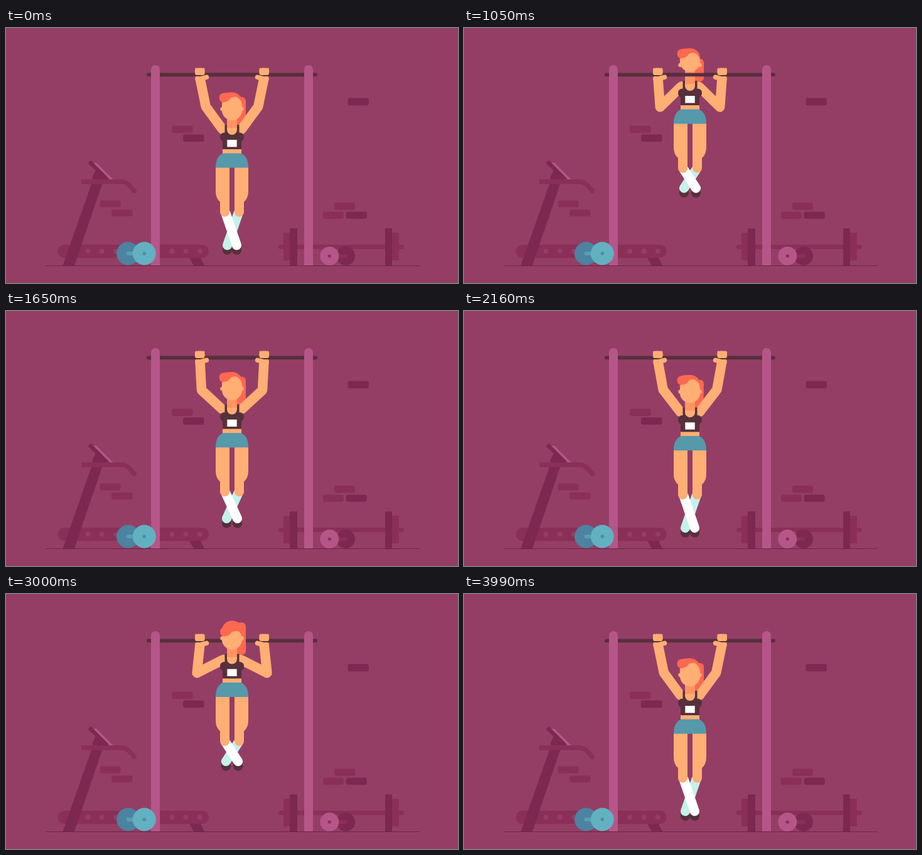
An HTML page for the animation above (4.02 s loop, 720 px wide and 406 px high).

```html
<!DOCTYPE html>
<html lang="en">
<head>
<meta charset="utf-8">
<title>Pull-ups</title>
<style>
html, body { margin: 0; width: 100%; height: 100%; overflow: hidden; background: #943e66; }
svg { display: block; width: 100vw; height: 100vh; }
.dark { fill: #7c2850; }
.mid { fill: #8a2f57; }
.pink { fill: #b65688; }
.skin { fill: #ffae74; }
.ink { fill: #56303b; }
.hair { fill: #ff6850; }
.limb { fill: none; stroke-width: 15; stroke-linecap: round; }
</style>
</head>
<body>
<svg viewBox="0 0 720 406">
  <defs>
    <g id="arm">
      <path id="bones" fill="none" stroke="#ffae74" stroke-width="15.5" stroke-linejoin="round"/>
      <rect class="skin" x="301.3" y="77" width="15.6" height="7" rx="2"/>
    </g>
    <g id="hand" class="skin">
      <rect x="301" y="66" width="15.5" height="9" rx="3"/>
      <rect x="301" y="63.5" width="4.4" height="9" rx="2.2"/>
      <rect x="304.7" y="63.2" width="4.4" height="9" rx="2.2"/>
      <rect x="308.4" y="63.2" width="4.4" height="9" rx="2.2"/>
      <rect x="312.1" y="63.5" width="4.4" height="9" rx="2.2"/>
      <path d="M312 80L319.5 78.3" stroke="#ffae74" stroke-width="7.4" stroke-linecap="round"/>
    </g>
    <path id="thigh" class="skin" d="M334 221H356V293a7.5 7.5 0 0 1-15 0V277Q334 271 334 260Z"/>
    <circle id="shoulder" class="skin" cx="347" cy="162.7" r="7.7"/>
  </defs>

  <rect width="720" height="406" fill="#943e66"/>

  <!-- wall -->
  <g class="mid">
    <rect x="264" y="155.5" width="33.5" height="11.5" rx="3"/>
    <rect x="149.5" y="274.5" width="33" height="11" rx="3"/>
    <rect x="168" y="289" width="33.5" height="11" rx="3"/>
    <rect x="523" y="278" width="33" height="11.5" rx="3"/>
    <rect x="504.7" y="292.5" width="33" height="11.3" rx="3"/>
  </g>
  <g class="dark">
    <rect x="282" y="169.5" width="33.5" height="11.5" rx="3"/>
    <rect x="544.5" y="111.5" width="33.3" height="11.7" rx="3"/>
    <rect x="541.7" y="292.5" width="33" height="11.3" rx="3"/>
  </g>

  <!-- treadmill -->
  <path class="dark" d="M291 364H309L316 378H299Z"/>
  <rect class="mid" x="82.5" y="345" width="240.5" height="21" rx="10.5"/>
  <path d="M130.5 355.5H310" stroke="#943e66" stroke-width="8" stroke-linecap="round" stroke-dasharray="0 22.3"/>
  <path class="dark" d="M90.5 378H109L155 243L139 240Z"/>
  <path class="dark" d="M135 215L160 238H141L147 226Z" stroke="#7c2850" stroke-width="7" stroke-linejoin="round"/>
  <path class="pink" d="M139 214.5H144L171 241.5H166Z"/>
  <path d="M120 244.8H184Q191 245 196 250L204.5 259.5" fill="none" stroke="#8a2f57" stroke-width="7.4"/>
  <circle class="mid" cx="204.3" cy="259.3" r="3.7"/>

  <!-- barbell -->
  <rect class="mid" x="434" y="345" width="200" height="7" rx="3.5"/>
  <path class="mid" d="M442 326h11v44h-11zM615 326h11v44h-11z"/>
  <path class="dark" d="M452 319h12v59h-12zM604 319h11v59h-11z"/>

  <path d="M64 378.5H659" stroke="#6b2347"/>

  <!-- pull-up frame -->
  <rect class="ink" x="224" y="71.6" width="272" height="5.6" rx="2.8"/>
  <path class="pink" d="M231 378V66a7 7 0 0 1 14 0V378zM475 378V66a7 7 0 0 1 14 0V378z"/>

  <!-- dumbbells -->
  <circle cx="194.5" cy="359" r="18.5" fill="#4b83a0"/>
  <rect x="191.5" y="356" width="25" height="6" rx="3" fill="#5b9db3"/>
  <circle cx="220.3" cy="359" r="18.5" fill="#62b1c1"/>
  <circle cx="220.3" cy="359" r="2.8" fill="#4b8ea3"/>
  <circle class="dark" cx="541" cy="363" r="15"/>
  <rect class="mid" x="520" y="360" width="24" height="6" rx="3"/>
  <circle class="pink" cx="515.3" cy="363" r="15"/>
  <circle class="mid" cx="515.3" cy="363" r="2.6"/>

  <!-- athlete -->
  <path id="tail" class="hair"/>
  <use href="#arm"/>
  <use href="#arm" transform="matrix(-1 0 0 1 720 0)"/>
  <g id="body">
    <circle id="shoeL" class="ink" r="7.7"/>
    <path id="shinR" class="limb" stroke="#c4f1ea"/>
    <circle id="shoeR" class="ink" r="7.7"/>
    <path id="shinL" class="limb" stroke="#fff"/>
    <use href="#thigh"/>
    <use href="#thigh" transform="matrix(-1 0 0 1 720 0)"/>
    <rect class="skin" x="345" y="191" width="30" height="11"/>
    <path fill="#5599ab" d="M346 199.5H374Q386 204 386 222.5H334Q334 204 346 199.5Z"/>
    <use href="#shoulder"/>
    <use href="#shoulder" transform="matrix(-1 0 0 1 720 0)"/>
    <path class="skin" d="M351 158H369V173H351Z"/>
    <rect x="352" y="134" width="16" height="25" fill="#ff9462"/>
    <path class="ink" d="M345 193V180.5Q341 178.5 341 173Q341 167 348.5 166.5V154H352V162A8 8 0 0 0 368 162V154H371.5V166.5Q379 167 379 173Q379 178.5 375 180.5V193Z"/>
    <rect x="352.3" y="178" width="15.4" height="11.3" fill="#fff"/>
    <ellipse id="cap" class="hair" cx="360" cy="119.5" rx="16.5" ry="17"/>
    <circle class="skin" cx="344.5" cy="129" r="3.2"/>
    <circle class="skin" cx="375.5" cy="129" r="3.2"/>
    <rect id="face" class="skin" x="344" width="32" rx="16"/>
    <path id="fringe" class="hair" d="M345.5 118.3A7.4 7.4 0 0 1 345.5 103.8Q352 102.4 360 102.4Q371 103 375.5 112Q366 107.5 358.5 111Q354 118.3 345.5 118.3Z"/>
  </g>
  <rect id="frontBar" class="ink" x="325" y="71.6" width="70" height="5.6"/>
  <use href="#hand"/>
  <use href="#hand" transform="matrix(-1 0 0 1 720 0)"/>
</svg>
<script>
const LOOP = 4020;
const el = id => document.getElementById(id);
const set = (id, attrs) => {
  for (const k in attrs) el(id).setAttribute(k, attrs[k]);
};
const part = (t, a, b) => Math.min(1, Math.max(0, (t - a) / (b - a)));
const smooth = x => x * x * (3 - 2 * x);
const ramp = (t, a, b) => smooth(part(t, a, b));
const rise = (t, a, b) => smooth(1 - (1 - part(t, a, b)) ** 1.35);

// Body height: a full pull-up, then a slightly lower one
const lift = t =>
  73 * (rise(t, 0, 870) - ramp(t, 947, 1788)) +
  63 * (rise(t, 2130, 2850) - ramp(t, 2843, 3811));

// How far the shins are folded back
const fold = t => 21 * (ramp(t, 0, 540) - ramp(t, 1400, 1900) +
  ramp(t, 2250, 2790) - ramp(t, 3000, 3960));

// Head pitch: positive looks up, negative looks down
const pitch = t => 9 * (ramp(t, 120, 520) - ramp(t, 1020, 1500)) -
  6 * (ramp(t, 2470, 2900) - ramp(t, 3050, 3600));

// Two-bone arm from the grip to the shoulder, elbow pointing outwards
function arm(up) {
  const hx = 309, hy = 80, fore = 46, upper = 47, sx = 346, sy = 163 - up;
  const d = Math.hypot(sx - hx, sy - hy);
  const ux = (sx - hx) / d, uy = (sy - hy) / d;
  const a = (fore ** 2 - upper ** 2 + d * d) / (2 * d);
  const h = Math.sqrt(Math.max(0, fore ** 2 - a * a));
  return `M${hx} ${hy}L${hx + ux * a - uy * h} ${hy + uy * a + ux * h}L${sx} ${sy}`;
}

function draw(now) {
  const t = now % LOOP, up = lift(t), bend = fold(t), p = pitch(t);
  const move = `translate(0 ${-up})`;
  const sway = Math.max(0, up - lift(t - 60));
  const sole = 361 - bend, spread = 7.5 + bend / 10;
  const down = Math.max(0, -p), back = Math.max(0, p);

  set('body', { transform: move });
  set('bones', { d: arm(up) });
  set('shoeL', { cx: 360 - spread, cy: sole - 7.7 });
  set('shoeR', { cx: 360 + spread, cy: sole - 7.7 });
  set('shinL', { d: `M350 295L${360 + spread} ${sole - 15}` });
  set('shinR', { d: `M370 295L${360 - spread} ${sole - 15}` });

  const top = 110 + p;
  set('tail', {
    transform: move,
    d: `M364 ${top}H376Q382 ${top} 382 ${top + 7}L${382 - sway} 150Q${381 - sway} 155 ${376 - sway / 2} 155H367Z`
  });
  set('cap', { cy: 119.5 - down / 4 });
  set('face', { y: 108 + down, height: 39 - down - back * .85 });
  set('fringe', { transform: `translate(${down / 4} ${down * 1.3})` });
  set('frontBar', { visibility: t < 1900 ? 'visible' : 'hidden' });
}

const start = performance.now();
function tick() {
  draw(performance.now() - start);
  requestAnimationFrame(tick);
}
tick();
</script>
</body>
</html>
```
